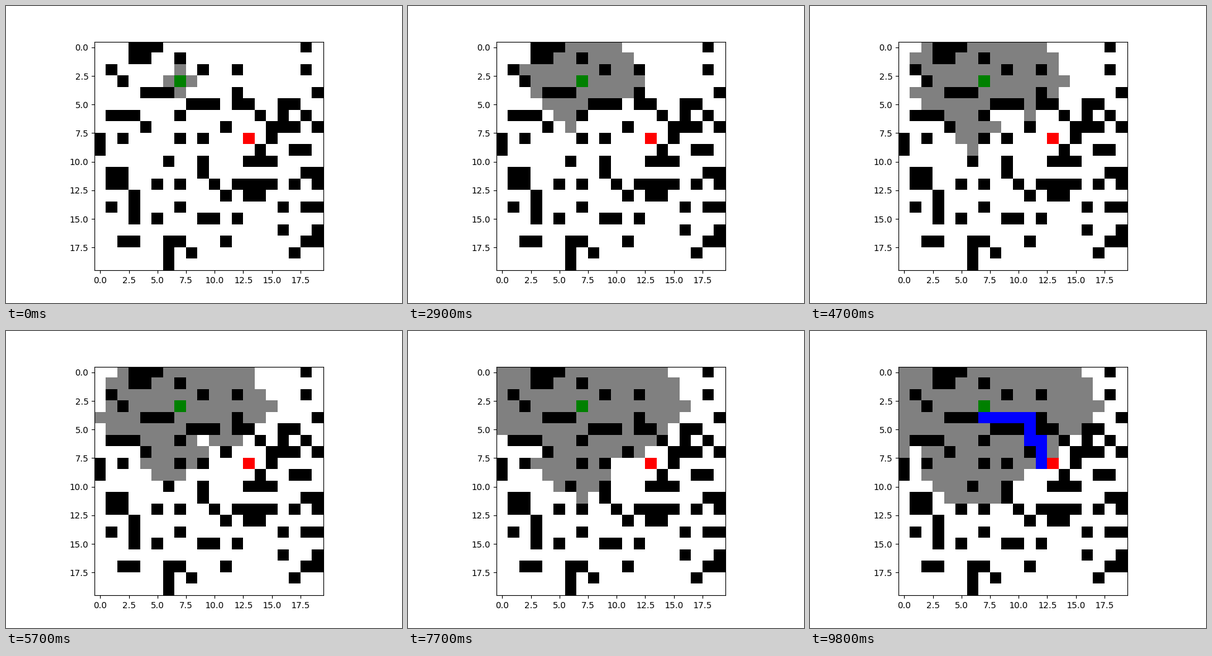
A matplotlib script for the animation above (9.9 s loop, 640 by 480 pixels).

```python
import numpy as np
import matplotlib.pyplot as plt
from matplotlib.animation import FuncAnimation
from matplotlib.colors import ListedColormap

SIZE = 20
START, GOAL = (3, 7), (8, 13)
FREE, WALL, BEGIN, END, SEEN, PATH = range(6)
COLORS = ["white", "black", "green", "red", "gray", "blue"]
STEPS = [(-1, 0), (1, 0), (0, 1), (0, -1)]  # up, down, right, left

# Wall columns, one list per row
WALLS = [
    [3, 4, 5, 18],
    [3, 4, 7],
    [1, 9, 12, 18],
    [2],
    [4, 5, 6, 12, 19],
    [8, 9, 10, 12, 13, 16, 17],
    [1, 2, 3, 7, 14, 16, 18],
    [4, 11, 15, 16, 17, 19],
    [0, 2, 7, 9, 15],
    [0, 14, 17, 18],
    [6, 9, 13, 14, 15],
    [1, 2, 9, 18, 19],
    [1, 2, 5, 7, 10, 12, 13, 14, 15, 17, 19],
    [3, 11, 13, 14],
    [1, 3, 7, 16, 18, 19],
    [3, 5, 9, 10, 12],
    [16, 19],
    [2, 3, 6, 7, 11, 18, 19],
    [6, 8, 17],
    [6],
]


def make_grid():
    grid = np.full((SIZE, SIZE), FREE)
    for row, cols in enumerate(WALLS):
        grid[row, cols] = WALL
    grid[START], grid[GOAL] = BEGIN, END
    return grid


def neighbours(cell):
    for dr, dc in STEPS:
        r, c = cell[0] + dr, cell[1] + dc
        if 0 <= r < SIZE and 0 <= c < SIZE:
            yield r, c


def search():
    """Breadth-first search; one picture per expansion that finds new cells."""
    grid = make_grid()
    parent = {START: None}
    queue = [START]
    pictures = []
    for cell in queue:
        around = list(neighbours(cell))
        if GOAL in around:
            while cell != START:
                grid[cell] = PATH
                cell = parent[cell]
            pictures.append(grid.copy())
            break
        fresh = [n for n in around if grid[n] == FREE]
        for n in fresh:
            grid[n] = SEEN
            parent[n] = cell
        queue.extend(fresh)
        if fresh:
            pictures.append(grid.copy())
    return pictures


pictures = search()

fig, ax = plt.subplots(figsize=(6.4, 4.8), dpi=100)
image = ax.imshow(pictures[0], cmap=ListedColormap(COLORS),
                  vmin=-0.5, vmax=5.5, interpolation="nearest")


def update(i):
    image.set_data(pictures[i])
    return [image]


anim = FuncAnimation(fig, update, frames=len(pictures), interval=100,
                     repeat=True, repeat_delay=0)
plt.show()
```
